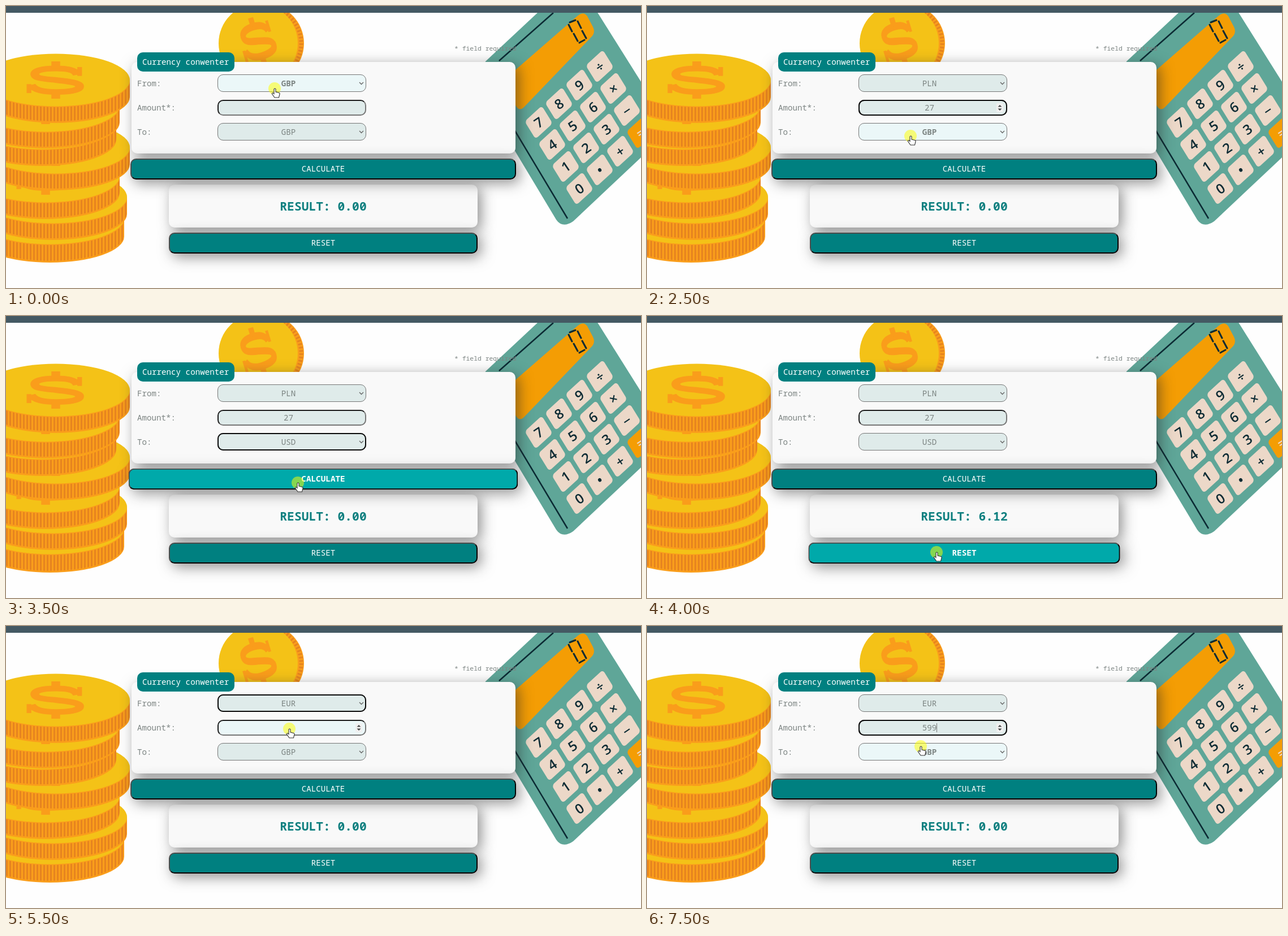
An HTML page that plays this animation: 1123x499 px, repeating every 8000 ms.

```html
<!DOCTYPE html>
<html lang="en">
<head>
<meta charset="utf-8">
<title>Currency form</title>
<style>
html, body { margin: 0; width: 100%; height: 100%; overflow: hidden; background: #fefefe; }
body { position: relative; font: 14.2px "Noto Sans Mono", "DejaVu Sans Mono", monospace; color: #7d8583; }
body > * { position: absolute; box-sizing: border-box; white-space: pre; }
svg { display: block; overflow: visible; }
.bar { left: 0; top: 0; width: 100%; height: 12px; background: #445963; }
.card, .button { border-radius: 10px; text-align: center; box-shadow: 6px 6px 25px rgba(40, 40, 40, .52); }
.card { background: #f9f9f9; }
.button { z-index: 1; height: 37px; border: 2px solid; border-color: #4c4c4c #000 #000 #4c4c4c;
  background: #008080; color: #fff; line-height: 32px; }
.button.hover { background: #00a9aa; font-weight: 700; transform: scale(1.01); }
.legend { left: 232px; top: 82px; width: 172px; height: 34px; padding-left: 9px; border-radius: 10px;
  background: #008080; color: #fff; line-height: 34px; }
.label { left: 232px; line-height: 30px; }
.field { left: 374px; width: 263px; height: 31px; padding-right: 12px; border: 1px solid #767676;
  border-radius: 10px; background: #dfebea; text-align: center; line-height: 29px; }
.field.hover { background: #ebf7f8; font-weight: 700; }
.field.focus { outline: 2px solid #0a0a0a; outline-offset: -2px; }
.field svg { position: absolute; left: 250px; top: 12px; }
#amount { top: 166px; height: 28px; border-width: 2px; border-color: #1c1c1c #767676 #767676 #1c1c1c; line-height: 24px; }
#amount svg { left: 242px; top: 4px; display: none; }
#amount.hover svg, #amount.focus svg { display: block; }
#caret { display: inline-block; width: 1px; height: 16px; margin-right: -1px; background: #777; vertical-align: -3px; }
#list { z-index: 2; left: 374px; width: 263px; height: 130px; background: #ebf5f5; box-shadow: 0 1px 8px rgba(0, 0, 0, .35);
  text-align: center; line-height: 32px; padding: 1px 0; }
#list div { padding-right: 12px; }
#list .pick { background: #767676; color: #fff; }
#result { left: 288px; top: 316px; width: 546px; height: 76px; line-height: 76px;
  font-size: 21.3px; font-weight: 600; color: #108080; }
#cursor { z-index: 3; left: 0; top: 0; }
</style>
</head>
<body>
<svg id="art" width="1123" height="499">
  <defs>
    <pattern id="ridges" width="6" height="6" patternUnits="userSpaceOnUse">
      <path d="M1.5 0V6" stroke="#e6841f" stroke-width="3"/>
    </pattern>
    <g id="dollar" fill="none" stroke="#fa9d1b" stroke-width="15">
      <path d="M37-14C33-28 18-31 0-31C-24-31-36-25-36-16C-36-4-20-3 0 0C24 4 41 7 41 17C41 28 22 32 0 32C-22 32-36 27-42 13"/>
      <path d="M0-50V-31M0 32V50"/>
      <path d="M41-35V-11M-46 11V35" stroke-width="8"/>
    </g>
  </defs>
  <g id="stack"></g>
  <circle cx="457" cy="66" r="70" fill="#fa9e1b"/>
  <circle cx="457" cy="66" r="65" fill="none" stroke="#e6841f" stroke-width="7" stroke-dasharray="3 3"/>
  <circle cx="446" cy="66" r="70" fill="#f4c217"/>
  <use href="#dollar" transform="translate(445 62) rotate(-17) scale(.62 .86)"/>
  <path d="M940 12L848 98L838 125L901 258L973 378Q984 394 1003 381L1123 268V134L1042 5Z" fill="#5fa698"/>
  <path d="M968 12L872 97M899 219L993 376" fill="none" stroke="#0b2a33" stroke-width="2.5"/>
  <path d="M1009 19Q1021 8 1028 18L1038 37Q1043 47 1035 55L916 179Q908 187 902 177L870 140Z" fill="#f49d04"/>
  <path d="M997 29L1007 25M995 33L1001 45M1004 49L1011 62M1011 27L1017 39M1019 44L1026 57M1014 65L1023 60"
    stroke="#0b2a33" stroke-width="3" stroke-linecap="round"/>
  <g id="keys" font-family="Open Sans, sans-serif" font-size="24" font-weight="600" text-anchor="middle" fill="#0b2a33"></g>
</svg>
<div class="bar"></div>
<div style="left:793px;top:66px;font-size:11.4px;line-height:18px">* field required</div>
<div class="card" style="left:222px;top:99px;width:679px;height:162px"></div>
<div class="legend">Currency conwenter</div>
<div class="label" style="top:122px">From:</div>
<div class="label" style="top:165px">Amount*:</div>
<div class="label" style="top:208px">To:</div>
<div class="field" id="from" style="top:121px"><span></span><svg width="8" height="6"><path d="M0 1L3.5 4.5L7 1" fill="none" stroke="#666" stroke-width="1.4"/></svg></div>
<div class="field" id="amount"><span></span><i id="caret"></i><svg width="12" height="16"><rect width="12" height="16" rx="2" fill="#f0f0f0"/><path d="M2.5 6.5L6 3L9.5 6.5ZM2.5 9.5L6 13L9.5 9.5Z" fill="#444"/></svg></div>
<div class="field" id="to" style="top:207px"><span></span><svg width="8" height="6"><path d="M0 1L3.5 4.5L7 1" fill="none" stroke="#666" stroke-width="1.4"/></svg></div>
<div class="button" id="calculate" style="left:220px;top:270px;width:682px">CALCULATE</div>
<div class="card" id="result"></div>
<div class="button" id="reset" style="left:288px;top:401px;width:546px">RESET</div>
<div id="list"></div>
<svg id="cursor" width="1" height="1">
  <circle r="11" fill="#ff0" fill-opacity=".52"/>
  <path d="M-1 1Q.5-1 2 1V6L7.5 7.5Q9.5 8 9 10L7.5 16H0L-4.5 9.5Q-4.5 7-2.5 8L-1 9.5Z" fill="#fff" stroke="#333" stroke-width="1.1"/>
</svg>
<script>
const $ = id => document.getElementById(id);

// Coins from the bottom up: centre x, centre y of the face
const coins = [[78, 375], [83, 338], [70, 301], [88, 250], [64, 207], [70, 176], [88, 131]];
const side = (x, y, depth) =>
  `M${x - 131} ${y}v${depth}a131 46 0 0 0 262 0v${-depth}z`;
$("stack").innerHTML = coins.map(([x, y], i) => {
  const depth = i ? 30 : 33;
  return `<path d="${side(x, y, depth)}" fill="#fa9e1b"/>
    <path d="${side(x, y, depth - 3)}" fill="url(#ridges)"/>
    <ellipse cx="${x}" cy="${y + 2}" rx="131" ry="46" fill="#fa9e1b"/>
    <ellipse cx="${x}" cy="${y}" rx="131" ry="46.5" fill="#f4c217"/>
    <use href="#dollar" transform="translate(${x} ${y}) scale(1.03 .66)"/>`;
}).join("");

$("keys").innerHTML = [..."789÷456×123−0•+="].map((sign, i) => {
  const col = i % 4, row = i >> 2, last = sign === "=";
  const x = 942 + 36 * col + 24 * row, y = 206 - 33 * col + 39 * row;
  return `<rect x="-21" y="-20" width="42" height="40" rx="6" fill="${last ? "#f49d04" : "#ecd8c8"}"
      transform="matrix(.72 -.66 .48 .78 ${x} ${y})"/>
    <text y="9" transform="translate(${x} ${y}) rotate(-34)" ${last ? 'fill="#ecd8c8"' : ""}>${sign}</text>`;
}).join("");

// One entry per half second; each changes only what differs from the one before
const blank = { from: "GBP", amount: "", to: "GBP", result: "0.00", hover: "from", focus: "", open: "", caret: false };
const steps = [
  { ...blank, at: [475, 146] },
  { open: "from", pick: "PLN", at: [488, 262] },
  { open: "", from: "PLN", hover: "amount", focus: "amount", caret: true, at: [497, 190] },
  { caret: false, at: null },
  { amount: "2" },
  { amount: "27", hover: "to", at: [466, 230] },
  { open: "to", focus: "", pick: "USD", at: [490, 316] },
  { open: "", to: "USD", hover: "calculate", focus: "to", at: [516, 295] },
  { hover: "reset", focus: "", result: "6.12", at: [512, 418] },
  { ...blank, at: [500, 150] },
  { open: "from", pick: "EUR", at: [500, 196] },
  { open: "", from: "EUR", hover: "amount", focus: "from", at: [501, 182] },
  { focus: "amount", caret: true, at: null },
  { amount: "59", caret: false },
  {},
  { amount: "599", caret: true, hover: "to", at: [484, 213] },
];
let last = {};
const states = steps.map(step => last = { ...last, ...step });

function show(s) {
  for (const id of ["from", "amount", "to", "calculate", "reset"]) {
    $(id).classList.toggle("hover", s.hover === id);
    $(id).classList.toggle("focus", s.focus === id);
    if (id in s) $(id).firstChild.textContent = s[id];
  }
  $("caret").style.visibility = s.caret ? "visible" : "hidden";
  $("result").textContent = "RESULT: " + s.result;
  $("list").style.display = s.open ? "block" : "none";
  $("list").style.top = (s.open === "to" ? 238 : 152) + "px";
  $("list").innerHTML = ["GBP", "EUR", "USD", "PLN"]
    .map(name => `<div class="${name === s.pick ? "pick" : ""}">${name}</div>`).join("");
  $("cursor").style.display = s.at ? "block" : "none";
  if (s.at) $("cursor").style.transform = `translate(${s.at[0]}px, ${s.at[1]}px)`;
}

let shown = -1;
function tick() {
  const index = Math.floor(performance.now() % 8000 / 500);
  if (index !== shown) show(states[shown = index]);
  requestAnimationFrame(tick);
}
tick();
</script>
</body>
</html>
```
